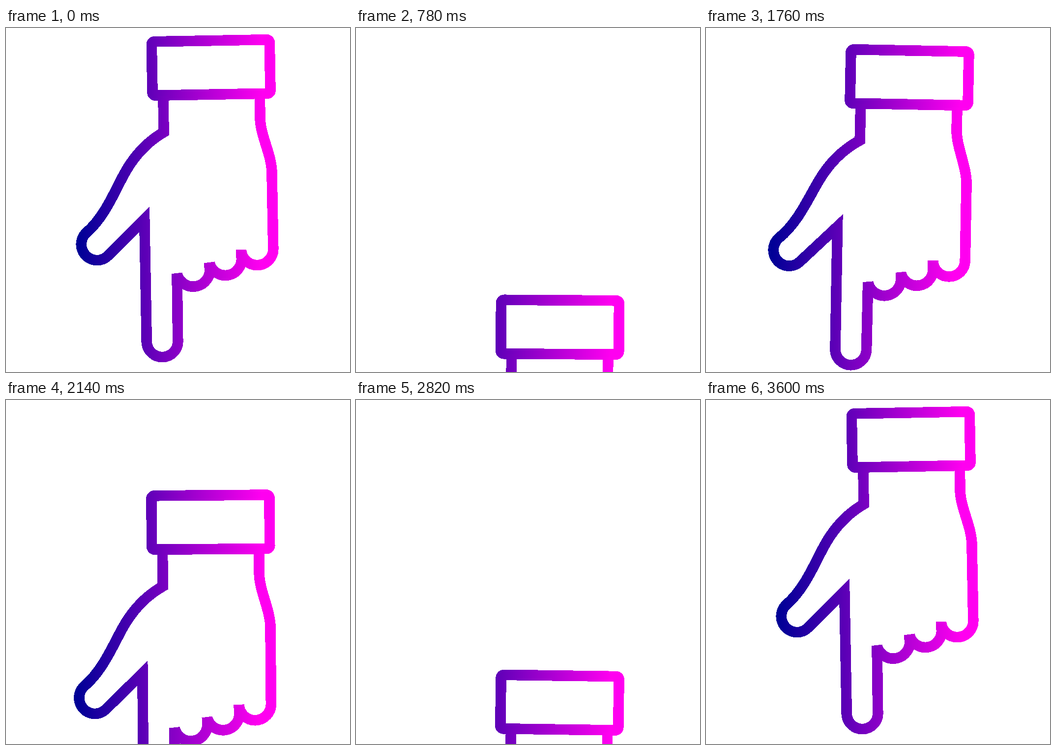
Animation, 700 px wide and 700 px high, one loop 3.62 s. Source, as an HTML page:

```html
<!DOCTYPE html>
<html lang="en">
<head>
<meta charset="utf-8">
<title>Pointing hand</title>
<style>
  html, body { margin: 0; width: 100%; height: 100%; overflow: hidden; background: #fff; }
  svg { display: block; width: 100vw; height: 100vh; }
</style>
</head>
<body>
<svg viewBox="0 0 700 700" shape-rendering="crispEdges">
  <defs>
    <linearGradient id="ink" gradientUnits="userSpaceOnUse" x1="150" y1="0" x2="520" y2="0">
      <stop offset="0" stop-color="#000096"/>
      <stop offset="1" stop-color="#ff00f0"/>
    </linearGradient>
  </defs>
  <g id="hand" fill="none" stroke="url(#ink)" stroke-width="21.6" stroke-miterlimit="6">
    <rect x="295.7" y="33" width="240" height="109.5" rx="6" transform="rotate(-1)"/>
    <path d="M320 138 L321 212
      C285 233 260 261 240 298 S200 385 164 416
      A32.5 32.5 0 0 0 185 472.7 A32.5 32.5 0 0 0 208 463
      L281.7 389 L286.3 640 A31.8 31.8 0 0 0 349.8 639 L348 500
      A33.8 33.8 0 0 0 414.3 487 L414 478
      A33.2 33.2 0 0 0 479.2 466 L478.5 451
      A32.6 32.6 0 0 0 543.8 449
      L541 295 C541 258 517 218 517 182 L516.4 138"/>
  </g>
</svg>
<script>
  const LOOP = 3620, STEP = 20, LEG = 900, TRAVEL = 546, TILT = 1.06, PHASE = -73;
  const hand = document.getElementById('hand');
  const sin = deg => Math.sin(deg * Math.PI / 180);
  const smooth = u => u * u * (3 - 2 * u);

  // Four legs: down, up, down, up; each ends in a short rest.
  function pose(t) {
    const m = Math.max(0, t - STEP);
    const leg = Math.min(3, Math.floor(m / LEG));
    const u = Math.min(1, (m - leg * LEG) / (LEG - STEP));
    const up = leg % 2;
    const depth = up ? 1 - u : u;
    const y = TRAVEL * (smooth(depth) + (up ? 0.012 * sin(360 * depth) : 0));
    const sway = TILT * (sin(270 * (leg + u) + PHASE) - sin(PHASE));
    return `translate(0 ${y.toFixed(2)}) rotate(${sway.toFixed(3)})`;
  }

  const start = performance.now();
  function draw() {
    const t = (performance.now() - start) % LOOP;
    hand.setAttribute('transform', pose(Math.floor(t / STEP) * STEP));
    requestAnimationFrame(draw);
  }
  draw();
</script>
</body>
</html>
```
